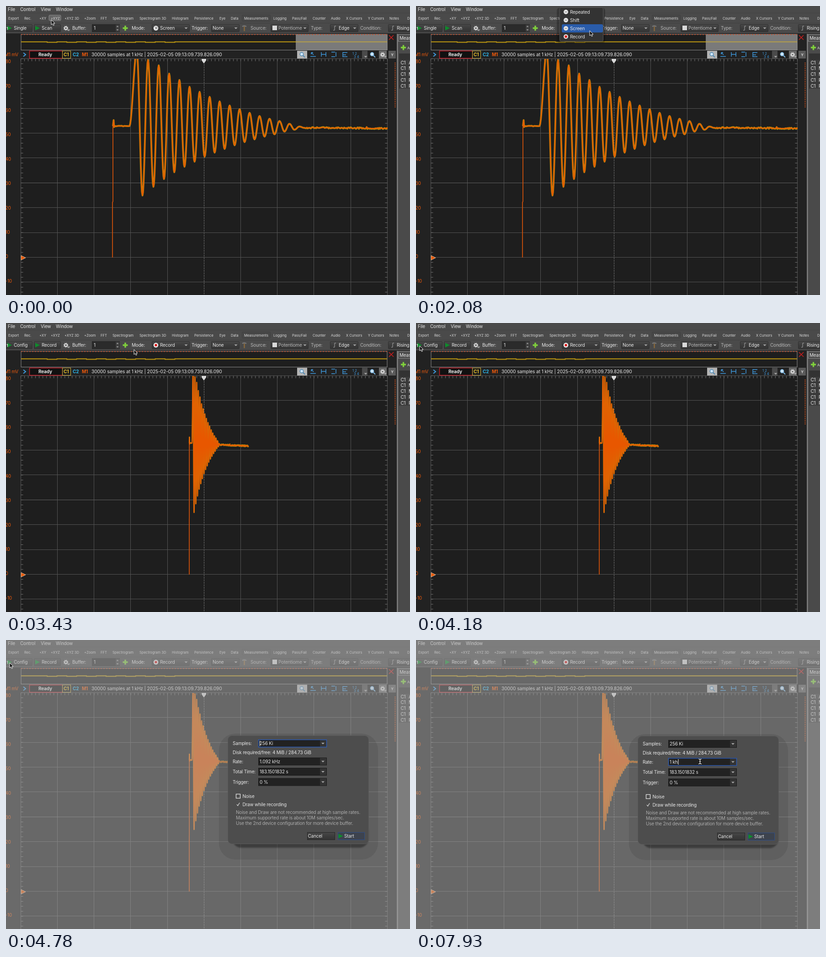
Write an HTML page that moves like this. It is 884 by 633 pixels and loops after 8000 ms.

```html
<!DOCTYPE html>
<html lang="en">
<head>
<meta charset="utf-8">
<title>Oscilloscope recording</title>
<style>
html, body { margin: 0; width: 100%; height: 100%; overflow: hidden; background: #222; }
svg { display: block; width: 884px; height: 633px; }
text { font: 10px Inter, "Open Sans", sans-serif; letter-spacing: -.2px; fill: #e8e8e8; white-space: pre; }
.tab { font-size: 7.55px; letter-spacing: 0; fill: #dcdcdc; }
.axis { fill: #ee5a0c; }
.bold { font-weight: 700; }
.info { font-size: 10.2px; letter-spacing: -.12px; }
.off { fill: #b8b8b8; }
.note { fill: #acacac; }
</style>
</head>
<body>
<svg id="stage" viewBox="0 0 884 633"></svg>
<script>
const LOOP = 8000;
const ORANGE = '#e85700', YELLOW = '#bd900c', BLUE = '#3f9be0', GREEN = '#0f8a2c';
const stage = document.getElementById('stage');

const text = (x, y, s, cls = '', extra = '') => `<text x="${x}" y="${y + 3.6}" class="${cls}" ${extra}>${s}</text>`;
const rect = (x, y, w, h, fill, extra = '') => `<rect x="${x}" y="${y}" width="${w}" height="${h}" fill="${fill}" ${extra}/>`;
const fill = (d, color, extra = '') => `<path d="${d}" fill="${color}" ${extra}/>`;
const line = (d, color, width = 1, extra = '') => `<path d="${d}" fill="none" stroke="${color}" stroke-width="${width}" ${extra}/>`;
const circle = (x, y, r, color, extra = '') => `<circle cx="${x}" cy="${y}" r="${r}" fill="${color}" ${extra}/>`;
const during = (from, to, body) => `<g data-from="${from}" data-to="${to}">${body}</g>`;

const arrow = (x, y) => fill(`M${x - 3.5} ${y - 1.5}h7l-3.5 3.5z`, '#a8a8a8');
const play = (x, y) => fill(`M${x} ${y - 5}l10 5l-10 5z`, GREEN);
const plus = (x, y) => line(`M${x - 5.5} ${y}h11M${x} ${y - 5.5}v11`, '#7fd03c', 3.4);
const gear = (x, y) => circle(x, y, 2.8, 'none', 'stroke="#dcdcdc" stroke-width="2"')
  + circle(x, y, 4.4, 'none', 'stroke="#dcdcdc" stroke-width="1.6" stroke-dasharray="1.7 1.75"') + arrow(x + 6, y + 4.5);
const lens = (x, y, color) => circle(x - 1, y - 1, 3.7, '#cfe6fa', `stroke="${color}" stroke-width="1.4"`)
  + line(`M${x + 2} ${y + 2}l4 4`, color, 2);
const button = (x, w) => rect(x + .5, 40.5, w, 16, 'url(#button)', 'rx="1.5" stroke="#303030"');
const combo = (x, w, extra = '') => button(x, w) + arrow(x + w - 7, 48.5) + extra;

function menus() {
  const menu = [[4, 'File'], [31, 'Control'], [76, 'View'], [109, 'Window']];
  const tabs = [[5, 'Export'], [40, 'Rec.'], [73, '+XY'], [98, '+XYZ'], [128, '+XYZ 3D'], [171, '+Zoom'], [207, 'FFT'],
    [233, 'Spectrogram'], [292, 'Spectrogram 3D'], [363, 'Histogram'], [412, 'Persistence'], [467, 'Eye'], [492, 'Data'],
    [521, 'Measurements'], [585, 'Logging'], [626, 'Pass/Fail'], [671, 'Counter'], [711, 'Audio'], [744, 'X Cursors'],
    [792, 'Y Cursors'], [839, 'Notes'], [878, 'Digital']];
  return rect(0, 0, 884, 60, '#4a4a4a') + rect(0, 15, 884, 1, '#434343') + rect(0, 37, 884, 1, '#404040') + rect(0, 59.5, 884, 1.5, '#2a2a2a')
    + during(0, 440, rect(94, 20, 26, 12, '#666', 'rx="2" stroke="#8a8a8a"'))
    + rect(516.5, 19.5, 62, 14, '#474747', 'rx="2" stroke="#404040"')
    + menu.map(([x, s]) => text(x, 7.5, s)).join('')
    + tabs.map(([x, s]) => text(x, 26.3, s, 'tab')).join('');
}

function controls() {
  const y = 48.5, changed = 2680;
  const swap = (x, a, b) => during(0, changed, text(x, y, a)) + during(changed, LOOP, text(x, y, b));
  return button(-4, 61) + play(3, y) + text(1, y, '1', 'bold', 'style="font-size:8px"') + swap(17, 'Single', 'Config')
    + button(61, 58) + play(64, y) + swap(78, 'Scan', 'Record')
    + gear(131, y) + text(145, y, 'Buffer:')
    + rect(188.5, 40.5, 60, 16, '#2b2b2b', 'stroke="#222"') + rect(240, 41, 8.5, 15, '#3e3e3e') + text(192, y, '1')
    + fill('M241.5 46h5l-2.5-3zM241.5 51h5l-2.5 3z', '#999')
    + plus(261, y) + text(275, y, 'Mode:') + combo(319, 82) + circle(328, y, 5.2, '#eee')
    + during(0, changed, line('M325.5 46.5h5v3h-4M328 46v5', '#666'))
    + during(changed, LOOP, circle(328, y, 2.7, '#d81818')) + swap(337, 'Screen', 'Record')
    + text(406, y, 'Trigger:') + combo(449, 61, text(452, y, 'None'))
    + line('M521.5 45v10', '#8c6a3c', 2.4) + line('M517 45q4-3 9 0', '#777', 2.6)
    + text(535, y, 'Source:', 'off') + combo(579, 82, rect(583, 43, 10, 10, '#d8d8d8') + text(596, y, 'Potentiome', 'off'))
    + text(667, y, 'Type:', 'off') + combo(709, 61, line('M716 53h3v-9h3', '#aaa') + text(728, y, 'Edge'))
    + text(775, y, 'Condition:', 'off') + button(836, 60) + line('M843 53h3v-9h3', '#aaa') + text(855, y, 'Rising');
}

function overview() {
  let wave = 'M33 78.5H90';
  for (let x = 90, low = 1; x < 390; x += 21.5, low = 1 - low) wave += `V${78.5 + low}h21.5`;
  return rect(33, 62, 801, 34.5, '#1e1e1e', 'stroke="#8c8c8c"')
    + line(wave + 'V78.5H834', '#c09a10', 1.8)
    + during(0, 2680, rect(634, 62, 200.5, 34.5, '#9a9a9a', 'opacity=".74"') + line('M634 78.5H834', '#b59a3c', 1.6))
    + line('M33 62.5H834', '#d0522c', 1.6, 'stroke-dasharray="3 3"')
    + line('M838 64l10 10m0-10l-10 10', '#c81e1e', 1.6);
}

function statusBar() {
  const y = 106.5;
  return line('M38 102.5l5 4l-5 4', BLUE, 2)
    + rect(51.5, 98.5, 72, 16, '#111', 'stroke="#d0202c" stroke-width="1.4"') + text(71, y, 'Ready', 'bold')
    + rect(123.5, 98.5, 18, 16, '#1c1c1c', 'stroke="#d6b43c"')
    + text(126, y, 'C1', 'bold', 'style="fill:#e8c02c"') + text(146, y, 'C2', 'bold', 'style="fill:#2cb4e8"')
    + text(166, y, 'M1', 'bold axis')
    + text(187, y, '30000 samples at 1 kHz | 2025-02-05 09:13:09.739.826.090', 'info')
    + rect(637, 98, 22, 17, '#b4b4b4') + lens(648, y, '#4c86b0')
    + line('M666 110.5h12M668 102l5 5m-5-5v4m0-4h4', BLUE, 1.4)
    + line('M690 101v10m10-10v10M690 106h10', BLUE, 1.4)
    + line('M712 101h8m-8 10h8m2-10v10', BLUE, 1.4)
    + line('M737 101v11M737 102h10M737 107h7M737 111h10', BLUE, 1.3)
    + text(758, 103, '1 2', 'tab', `style="fill:${BLUE}"`) + text(761, 110, '3 4', 'tab', `style="fill:${BLUE}"`)
    + rect(779, 98, 12, 17, '#4a4a4a') + arrow(787, 111) + lens(802, y, '#7ab8e4')
    + rect(816, 98, 17, 17, '#6a6a6a') + gear(824, y)
    + rect(837, 98, 16, 17, '#5a5a5a') + text(842.5, y, 'Y', 'tab bold');
}

function sidePanel() {
  return rect(854, 61, 30, 572, '#4a4a4a') + rect(854, 61, 1.5, 572, '#2a2a2a') + rect(855.5, 61, 2, 572, '#8a8a8a')
    + rect(858.5, 62.5, 40, 15, '#4c4c4c', 'stroke="#888"') + text(861, 70.3, 'Meas')
    + plus(869.5, 91) + text(878, 91.5, 'Add', 'tab')
    + rect(860, 104, 24, 77, '#333')
    + ['Av', 'Max', 'Min', 'Freq', 'Per'].map((s, i) => rect(862, 118 + i * 12.75, 22, 12, '#3c3c3c')
      + text(863.5, 124 + i * 12.75, 'C1') + text(881, 124 + i * 12.75, s)).join('')
    + line('M851.5 124V224', '#c8501c', 2, 'stroke-dasharray="2 2"');
}

function grid() {
  let body = rect(32, 116, 803, 517, '#1e1e1e');
  for (let i = 0; i <= 10; i++) {
    const x = Math.floor(32.2 + i * 80.2) + .5, y = Math.floor(115.2 + i * 54.4) + .5, mid = i === 5;
    body += line(`M${x} 116V633`, mid ? '#707070' : '#545454', 1, mid ? 'stroke-dasharray="4 1.5"' : '')
      + line(`M32 ${y}H835`, mid ? '#606060' : '#545454');
    body += text(-1.5, 121.5 + i * 53.4, 80 - i * 10, 'axis');
  }
  const minor = 'stroke-dasharray="1 9.88"';
  return body + line('M35 115V633', '#747474', 5, minor) + line('M832 115V633', '#747474', 5, minor)
    + line('M32 118.5H835', '#747474', 5, 'stroke-dasharray="1 7.02"')
    + text(-3, 106.5, 'M1 mV', 'axis');
}

// Trace: a step, then a ringing decay through alternating extremes, then a noisy tail.
function tracePoints(noiseSize) {
  const extremes = [100, 415, 118, 396, 130, 379, 148, 364, 162, 352, 177, 341, 188, 330, 199, 321, 209,
    313, 218, 305, 226, 298, 234, 292, 241, 286, 247, 281, 252, 275, 258, 271, 264, 267];
  const noise = x => ((Math.abs(Math.sin(x * 12.9898) * 43758.5453) % 1) * 2 - 1) * noiseSize;
  const points = [[234, 263], [235.5, 250], [236.5, 265], [238, 263]];
  for (let x = 241; x < 269; x += 3) points.push([x, 263 + noise(x) * .5]);
  let x0 = 270, y0 = 263;
  extremes.forEach((y1, i) => {
    const x1 = 286.2 + 10.9 * i + 7 * (1 - Math.exp(-i / 4));
    for (let s = 0; s < 1; s += .1) {
      points.push([x0 + (x1 - x0) * s, y0 + (y1 - y0) * (1 - Math.cos(Math.PI * s)) / 2]);
    }
    x0 = x1; y0 = y1;
  });
  for (let x = 655; x < 1044; x += 1.7) {
    points.push([x, 266.6 + (x - 650) * .0072 + noise(x) - (x > 788 && x < 791 ? 3 : 0)]);
  }
  return points;
}

function trace(scale, yellowWidth, orangeWidth) {
  const mapX = x => 433 + (x - 433) * scale;
  const curve = (noiseSize, color, width) => line(
    'M' + tracePoints(noiseSize).map(([x, y]) => `${mapX(x).toFixed(2)} ${y.toFixed(1)}`).join('L'),
    color, width, 'stroke-linejoin="round"');
  return curve(1.6, YELLOW, yellowWidth)
    + line(`M${mapX(233)} 551V430L${mapX(234)} 428V262`, '#cc500c', 1.8)
    + curve(.7, ORANGE, orangeWidth);
}

function plot() {
  return grid() + '<g clip-path="url(#plot)">'
    + during(0, 2680, trace(1, 3.8, 2))
    + during(2680, LOOP, trace(.16, 2.7, 1.9)) + '</g>'
    + fill('M428 116h10v3l-5 7l-5-7z', '#d8d8d8')
    + fill('M33 546.5l10 5l-10 5z', ORANGE, 'stroke="#e8d8c8" stroke-width=".8"');
}

function modeList() {
  const items = ['Repeated', 'Shift', 'Screen', 'Record'];
  const highlight = y => rect(319, y, 90, 18, '#2a5caa', 'rx="3"');
  return during(1780, 2680, rect(308, 4, 106, 77, '#000', 'opacity=".25" rx="6"')
    + rect(314.5, 3.5, 95, 74, '#333', 'rx="3" stroke="#555"')
    + during(1780, 2230, highlight(40)) + during(2230, 2680, highlight(58))
    + items.map((s, i) => circle(328, 13 + i * 18, 5, '#e4e4e4')
      + (i === 3 ? circle(328, 67, 2.7, '#d81818') : line(`M325.5 ${13 + i * 18}h5`, '#666'))
      + text(337, 13 + i * 18, s)).join(''));
}

function dialog() {
  const focus = y => rect(552.5, y - 8, 149, 16, 'none', 'stroke="#2c5cb8" stroke-width="1.4"');
  const caret = (x, y) => rect(x, y - 6, 1, 12, '#fff');
  const field = (y, label, value) => text(496, y, label)
    + rect(552.5, y - 8, 149, 16, '#222', 'stroke="#191919"') + rect(687, y - 7.5, 14, 15, '#343434') + arrow(693.5, y)
    + (value ? text(555, y, value) : '');
  const rate = 267;
  const typed = [[7330, 7480, '1', 560], [7480, 7630, '1 ', 562.5], [7630, 7930, '1 k', 567.5], [7930, LOOP, '1 kh', 573.5]];
  return during(4630, LOOP, '<rect id="dim" width="884" height="633" fill="#adadad"/><g id="dialog">'
    + rect(466, 206, 348, 276, '#000', 'rx="36" opacity=".09"')
    + rect(495, 400, 298, 56, '#000', 'rx="20" opacity=".35" filter="url(#soft)"')
    + rect(485.5, 210.5, 308, 237, '#4d4d4d', 'rx="9" stroke="#5a5a5a"')
    + during(4630, 4780, rect(495, 329, 289, 87, '#000', 'rx="2" opacity=".14"'))
    + field(227.5, 'Samples:', '256 Ki') + during(4630, 5680, focus(227.5) + caret(555, 227.5))
    + text(496, 247.5, 'Disk required/free: 4 MiB / 284.73 GiB')
    + field(rate, 'Rate:')
    + during(5980, 7330, rect(555, 261, 48, 12, '#2c5cb8'))
    + during(4630, 7330, text(555, rate, '1.092 kHz'))
    + during(5680, 5980, caret(555, rate))
    + typed.map(([from, to, s, x]) => during(from, to, text(555, rate, s) + caret(x, rate))).join('')
    + during(5680, LOOP, focus(rate))
    + field(289.5, 'Total Time:', '183.1501832 s') + field(312, 'Trigger:', '0 %')
    + rect(503.5, 338.5, 9, 9, 'none', 'stroke="#e4e4e4" stroke-width="1.3"') + text(517.5, 343.5, 'Noise')
    + line('M505 361l2.2 3l4-6.5', '#e4e4e4', 1.2) + text(517.5, 361, 'Draw while recording')
    + text(503, 378, 'Noise and Draw are not recommended at high sample rates.', 'note')
    + text(503, 390, 'Maximum supported rate is about 10M samples/sec.', 'note')
    + text(503, 402, 'Use the 2nd device configuration for more device buffer.', 'note')
    + rect(659.5, 422.5, 60, 16, 'url(#button)', 'stroke="#262626"') + text(660.5, 430.5, 'Cancel')
    + rect(726.5, 422.5, 58, 16, '#3d434e', 'stroke="#2c4c88"') + play(727.5, 430.5) + text(740, 430.5, 'Start')
    + '</g>');
}

function textCursor() {
  const beam = 'M618 260.5q3 0 3.5 2v7q-.5 2-3.5 2M625 260.5q-3 0-3.5 2m0 7q.5 2 3.5 2M619.5 266h4';
  return during(5980, LOOP, line(beam, '#111', 2.6) + line(beam, '#fff', 1.1));
}

stage.innerHTML = `<defs>
  <clipPath id="plot"><rect x="32" y="116" width="803" height="517"/></clipPath>
  <filter id="soft"><feGaussianBlur stdDeviation="1.5"/></filter>
  <linearGradient id="button" x2="0" y2="1"><stop stop-color="#484848"/><stop offset=".5" stop-color="#3c3c3c"/><stop offset="1" stop-color="#343434"/></linearGradient>
</defs>`
  + rect(0, 0, 884, 633, '#222') + menus() + controls() + plot() + overview() + statusBar() + sidePanel() + modeList() + dialog()
  + `<g id="pointer">${fill('M0 0V11L2.6 8.7L4.4 12.6L6.3 11.8L4.6 8H8z', '#111', 'stroke="#f4f4f4" stroke-width="1"')}</g>`
  + textCursor();

// [time, x, y]
const pointerSteps = [[0, 99, 30], [300, 93, 34], [440, 75, 47], [590, 71, 50], [1340, 240, 51], [1490, 382, 50],
  [2080, 380, 54], [2230, 375, 60], [2380, 374, 63], [3280, 356, 62], [3430, 280, 58], [3580, 180, 53], [3730, 95, 48],
  [3880, 42, 47], [4030, 15, 48], [4180, 8, 50], [4930, 60, 56], [5080, 260, 80], [5230, 470, 97], [5380, 600, 103],
  [5530, 636, 103], [5980, -50, -50]];
// [time, dialog offset, dialog opacity, dim opacity]
const dialogSteps = [[0, -15.5, .86, .25], [4780, -1, 1, .52], [4930, 0, 1, .52]];

const stepAt = (steps, t) => steps.findLast(step => step[0] <= t);
const timed = [...stage.querySelectorAll('[data-from]')];
const [pointer, panel, dim] = ['pointer', 'dialog', 'dim'].map(id => document.getElementById(id));

function draw() {
  const t = performance.now() % LOOP;
  for (const el of timed) el.style.display = t >= +el.dataset.from && t < +el.dataset.to ? '' : 'none';
  const [, x, y] = stepAt(pointerSteps, t);
  pointer.setAttribute('transform', `translate(${x} ${y})`);
  const [, offset, opacity, dimming] = stepAt(dialogSteps, t);
  panel.setAttribute('transform', `translate(0 ${offset})`);
  panel.setAttribute('opacity', opacity);
  dim.setAttribute('opacity', dimming);
  requestAnimationFrame(draw);
}
draw();
</script>
</body>
</html>
```
